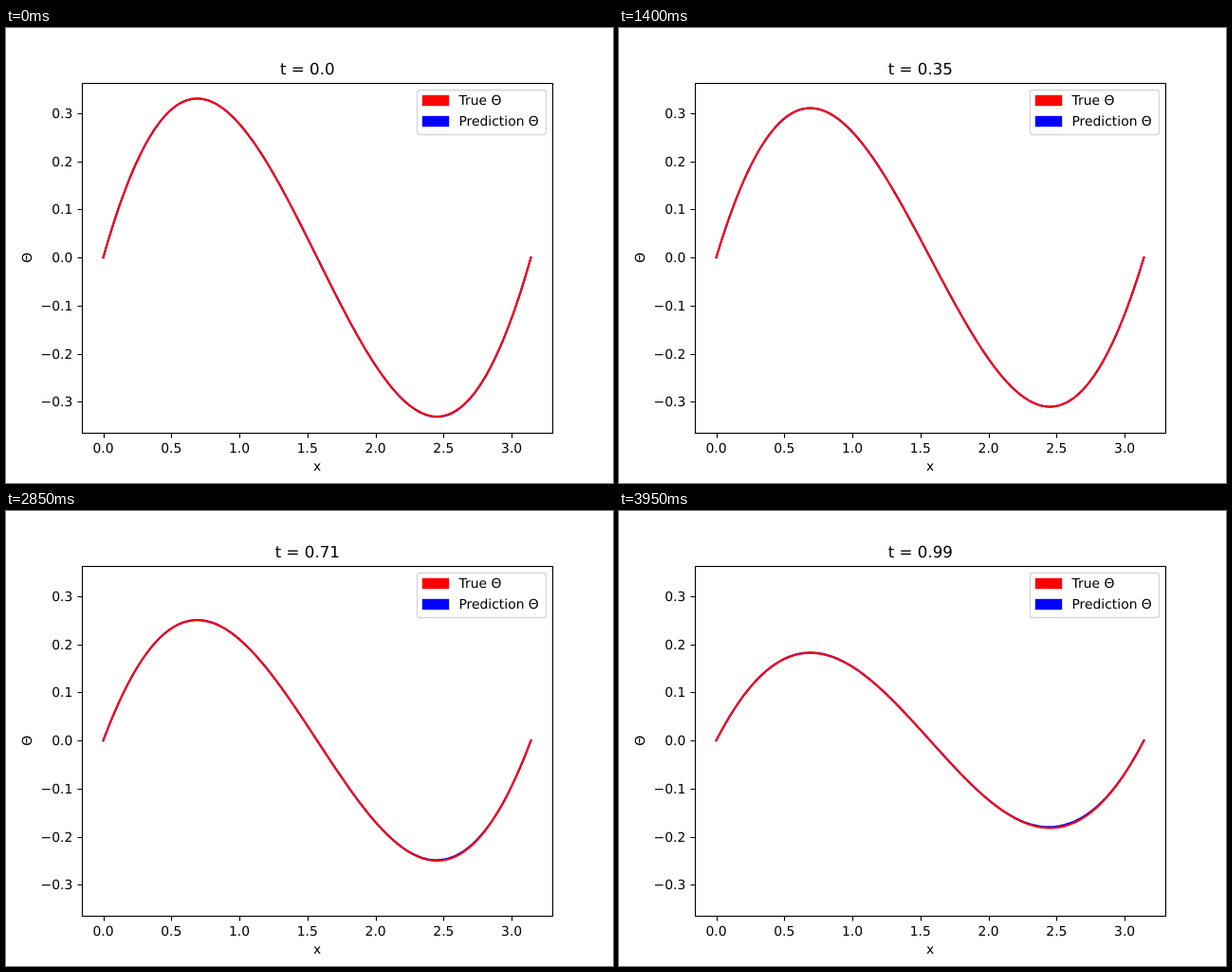
Animation of 640x480 px, one loop 4 s. Source, as an HTML page:

```html
<!DOCTYPE html>
<html lang="en">
<head>
<meta charset="utf-8">
<title>True and predicted curve</title>
<style>
  html, body { margin: 0; width: 100%; height: 100%; overflow: hidden; background: #fff; }
  svg { display: block; width: 640px; height: 480px; }
  text { font: 13.89px "DejaVu Sans", sans-serif; fill: #000; text-rendering: geometricPrecision; white-space: pre; }
  #title { font-size: 16.67px; }
  .mid { text-anchor: middle; }
  .end { text-anchor: end; }
  .axis { fill: none; stroke: #000; stroke-width: 1.11; }
  .curve { fill: none; stroke-width: 2.08; stroke-linecap: square; stroke-linejoin: round; }
  .patch { stroke-width: 1.39; }
</style>
</head>
<body>
<svg id="plot" viewBox="0 0 640 480">
  <path id="pred" class="curve" stroke="#00f"/>
  <path id="real" class="curve" stroke="#f00"/>
  <path id="ticks" class="axis"/>
  <rect class="axis" x="80.5" y="58.5" width="496" height="369"/>
  <text id="title" class="mid" x="317.8" y="49"></text>
  <text class="mid" x="328" y="467">x</text>
  <text class="mid" transform="translate(27 242.3) rotate(-90)">Θ</text>
  <rect x="433.5" y="65.5" width="136" height="47" rx="2.8" fill="#fff" fill-opacity=".8" stroke="#ccc" stroke-opacity=".8" stroke-width="1.39"/>
  <rect class="patch" x="439.5" y="71.5" width="27" height="10" fill="#f00" stroke="#f00"/>
  <rect class="patch" x="439.5" y="93.5" width="27" height="10" fill="#00f" stroke="#00f"/>
  <text x="477.5" y="81">True Θ</text>
  <text x="477.5" y="103">Prediction Θ</text>
</svg>
<script>
const STEP = 50, COUNT = 80, POINTS = 200;
const $ = id => document.getElementById(id);
const px = x => 102.545 + x * 143.53;
const py = y => 242.1 - y * 507;
const snap = v => Math.floor(v + 0.5) + 0.5;

function label(str, x, y, cls) {
  const el = document.createElementNS("http://www.w3.org/2000/svg", "text");
  el.setAttribute("x", x);
  el.setAttribute("y", y);
  el.setAttribute("class", cls);
  el.textContent = str;
  $("plot").append(el);
}

function drawTicks() {
  let d = "";
  for (let i = 0; i <= 6; i++) {
    const x = px(i / 2);
    d += `M${snap(x)} 427.5V432.5`;
    label((i / 2).toFixed(1), x, 448, "mid");
  }
  for (let i = -3; i <= 3; i++) {
    const y = snap(py(i / 10));
    d += `M75.5 ${y}H80.5`;
    label((i < 0 ? "−" : "") + Math.abs(i / 10).toFixed(1), 70.3, y + 4.5, "end");
  }
  $("ticks").setAttribute("d", d);
}

const truth = (x, t) => (x + Math.PI / 2 * (Math.cos(x) - 1)) * Math.cos(t);
const bump = (x, mid, width) => Math.exp(-(((x - mid) / width) ** 2));

// Small error of the fitted curve, in pixels upward
const drift = (x, t) =>
  (1.85 * t - 0.45) * bump(x, 2.58, 0.33) + 0.4 * t * bump(x, 0.8, 0.45);

function curve(f) {
  let d = "";
  for (let i = 0; i <= POINTS; i++) {
    const x = Math.PI * i / POINTS;
    d += (i ? "L" : "M") + px(x).toFixed(2) + " " + py(f(x)).toFixed(2);
  }
  return d;
}

// Two decimals, ties to even
function round2(t) {
  const v = t * 100;
  let n = Math.round(v);
  if (n - v === 0.5 && n % 2) n--;
  const s = String(n / 100);
  return s.includes(".") ? s : s + ".0";
}

let shown = -1;
function draw(now) {
  const k = Math.floor(now / STEP) % COUNT;
  if (k !== shown) {
    shown = k;
    const t = k * 0.05 / 4;
    $("title").textContent = "t = " + round2(t);
    $("real").setAttribute("d", curve(x => truth(x, t)));
    $("pred").setAttribute("d", curve(x => truth(x, t) + drift(x, t) / 507));
  }
}

drawTicks();
draw(0);
const start = performance.now();
function loop() {
  draw(performance.now() - start);
  requestAnimationFrame(loop);
}
requestAnimationFrame(loop);
</script>
</body>
</html>
```
